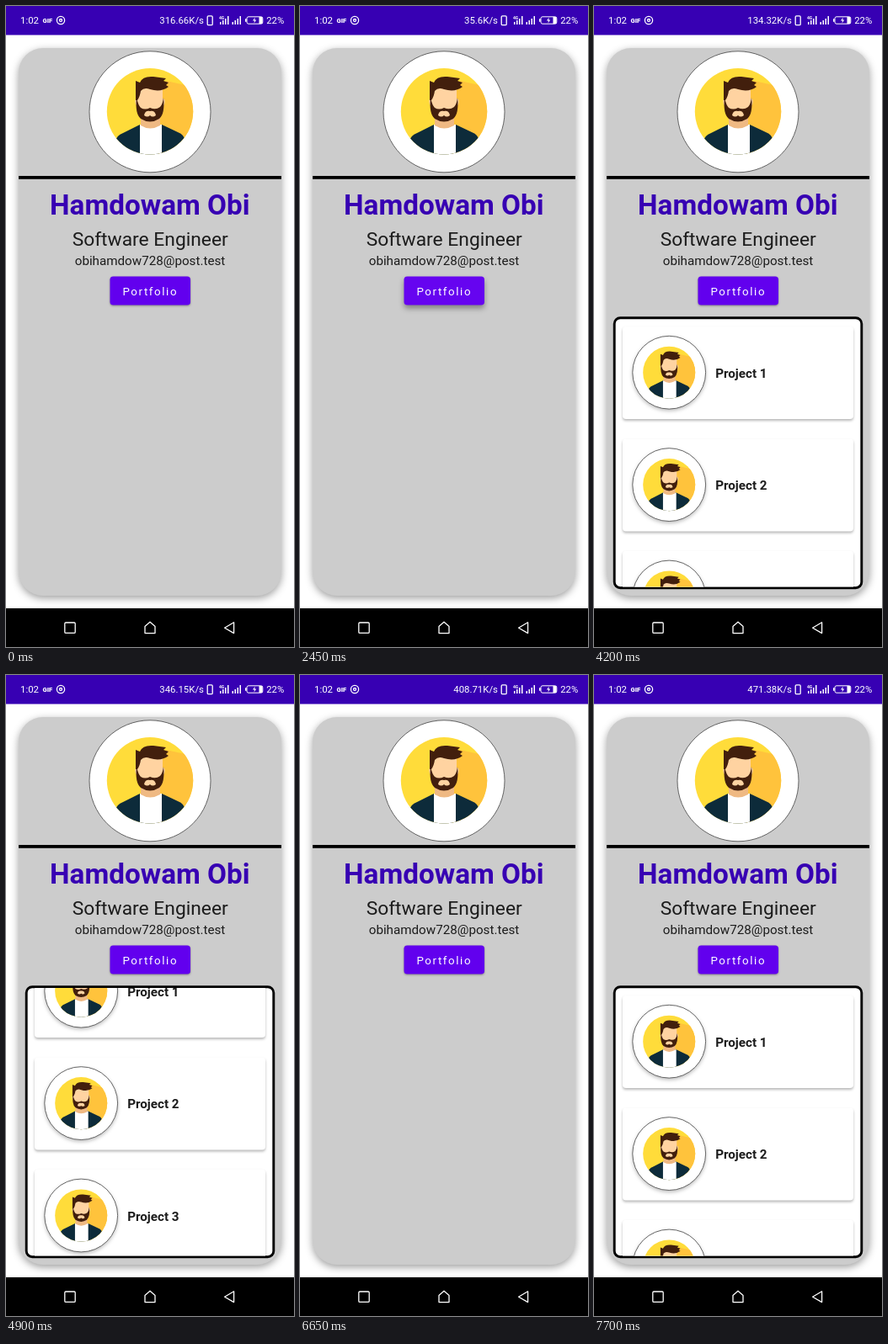
These frames come from a looping animation (342 px wide and 762 px high, 8 s). An HTML page:

```html
<!DOCTYPE html>
<html lang="en">
<head>
<meta charset="utf-8">
<title>Profile card</title>
<style>
  html, body { margin: 0; width: 100%; height: 100%; overflow: hidden; background: #fff; }
  svg { display: block; width: 342px; height: 762px; font-family: Roboto, sans-serif; }
  .mid { text-anchor: middle; }
  .status { font-size: 11.4px; fill: #fff; }
  .project { font-size: 15.2px; font-weight: 700; fill: #1c1c1c; }
  .line { fill: none; stroke: #fff; stroke-width: 1.3; stroke-linejoin: round; }
  #card { filter: drop-shadow(0 3px 5px rgba(0,0,0,.38)); }
  .item { fill: #fff; filter: drop-shadow(0 2px 1.5px rgba(0,0,0,.28)); }
  .lift { filter: drop-shadow(0 2px 2px rgba(0,0,0,.25)); }
  #button { fill: #6200ee; filter: drop-shadow(0 1px 1px rgba(0,0,0,.35)); }
  #button.raised { fill: #6604f0; filter: drop-shadow(0 4px 3px rgba(0,0,0,.36)); }
</style>
</head>
<body>
<svg viewBox="0 0 342 762">
  <defs>
    <clipPath id="disk"><circle cx="171" cy="125.3" r="51.2"/></clipPath>
    <clipPath id="window"><rect x="25.5" y="372" width="291" height="318.5" rx="5"/></clipPath>
    <g id="portrait">
      <g clip-path="url(#disk)">
        <path fill="#ffdc3a" d="M115 70h112v112H115z"/>
        <path fill="#ffc33c" d="M183 100L190 89L213 94L232 112V182H180z"/>
        <path fill="#0d2b3a" d="M130 182V161Q131 154 139 151L159 141H185L204 150Q212 153 213 161V182z"/>
        <path fill="#fff" d="M159 141H185V182H159z"/>
        <path fill="#efb983" d="M160 126H183V142Q171 149 160 142z"/>
        <path fill="#ffd3a1" d="M156 94H186V110Q190 110 188 117L186 120Q184 134 171 135Q158 134 156 120L154 117Q152 110 156 110z"/>
        <path fill="#421f0d" d="M154 112V89L159 91Q162 83 175 84L190 86L187 89L193 91L190 94L193 96Q184 103 171 99Q164 96 160 101Q159 108 156 112z"/>
        <path fill="#421f0d" d="M155 109Q157 118 160 121Q165 124 171 121Q178 124 183 120Q186 117 187 109Q189 128 182 134Q171 141 160 134Q153 128 155 109z"/>
        <path fill="#ffd3a1" d="M164 130Q165 124 171 125Q177 124 178 130Q174 133 171 130Q168 133 164 130z"/>
      </g>
    </g>
    <g id="bars">
      <path fill="#fff" d="M0 8h1.5v3H0zM3 6h1.5v5H3zM6 4h1.5v7H6zM9 1h1.5v10H9z"/>
    </g>
  </defs>

  <rect width="342" height="762" fill="#fff"/>
  <rect id="card" x="15" y="50" width="312" height="651" rx="29" fill="#ccc"/>
  <circle cx="171" cy="125.8" r="72" fill="#fff" stroke="#555" stroke-width=".9"/>
  <use href="#portrait"/>
  <rect x="15" y="202" width="312" height="3.8"/>

  <text class="mid" x="170.8" y="248" font-size="33.25" font-weight="700" fill="#3700b3">Hamdowam Obi</text>
  <text class="mid" x="171.2" y="285" font-size="22.8" fill="#1c1c1c">Software Engineer</text>
  <text class="mid" x="171" y="308" font-size="15.2" fill="#1c1c1c">obihamdow728@post.test</text>

  <rect id="button" x="123.5" y="321.5" width="95.5" height="34" rx="3.8"/>
  <text x="138.4" y="343.7" font-size="13.3" letter-spacing="1.6" fill="#fff">Portfolio</text>

  <g id="list">
    <rect x="24.2" y="370.7" width="293.6" height="321" rx="7" fill="#fff" stroke="#000" stroke-width="2.9"/>
    <g clip-path="url(#window)"><g id="items"></g></g>
  </g>

  <rect width="342" height="34.5" fill="#3700b3"/>
  <g class="status">
    <text x="17" y="21.3">1:02</text>
    <text x="43.5" y="20" font-size="7.6" font-weight="900">GIF</text>
    <circle class="line" cx="65" cy="17" r="4.6"/>
    <circle class="line" cx="65" cy="17" r="1.5"/>
    <text id="speed" x="235" y="21.3" text-anchor="end"></text>
    <rect class="line" x="239.2" y="11.8" width="6" height="10.8" rx="1.2" stroke-width="1"/>
    <text x="253" y="15.5" font-size="5" font-weight="700">4G</text>
    <use href="#bars" x="254" y="11"/>
    <use href="#bars" x="268.5" y="11"/>
    <rect class="line" x="286" y="12.8" width="18.8" height="8.4" rx="2" style="stroke-width:1"/>
    <path d="M284 15.3h1.6v3.4H284zM300.5 13h4v8h-4zM295.7 13.5L293 17.5h2l-.5 3 2.7-4h-2z"/>
    <text x="330.3" y="21.3" text-anchor="end">22%</text>
  </g>

  <rect y="716" width="342" height="46"/>
  <g class="line">
    <rect x="69.8" y="733" width="12.4" height="12.4" rx="1.2"/>
    <path d="M165 737.5L171 732.3L177 737.5V745.6H165z"/>
    <path d="M259.6 739.2L270.6 732.8V745.6z"/>
  </g>
</svg>
<script>
const LOOP = 8000, PITCH = 133.4;
const $ = id => document.getElementById(id);

// start time, network speed, list scroll (null = closed), button raised
const steps = [
  [0, "316.66", null, false],
  [350, "316.66", 0, true],
  [700, "77.14", null, true],
  [1400, "77.14", null, false],
  [2450, "35.6", null, true],
  [2800, "35.6", 0, true],
  [3150, "35.6", 0, false],
  [3500, "134.32", null, false],
  [4200, "134.32", 0, false],
  [4900, "346.15", 60, false],
  [5250, "346.15", 99.7, false],
  [6650, "408.71", null, false],
  [7350, "471.38", 99.7, false],
  [7700, "471.38", 0, false]
];

const item = n => `<g transform="translate(0 ${(n - 1) * PITCH})">
  <rect class="item" x="34" y="381" width="274" height="110" rx="4"/>
  <circle class="lift" cx="89.2" cy="435.7" r="43.4" fill="#fff" stroke="#555" stroke-width=".9"/>
  <use href="#portrait" transform="translate(89.2 435.7) scale(.606) translate(-171 -125.3)"/>
  <text class="project" x="144.2" y="442">Project ${n}</text>
</g>`;
$("items").innerHTML = [1, 2, 3, 4].map(item).join("");

let shown;
function draw() {
  const time = performance.now() % LOOP;
  const step = steps.findLast(([at]) => at <= time);
  if (step !== shown) {
    const [, speed, scroll, raised] = shown = step;
    $("speed").textContent = speed + "K/s";
    $("list").style.display = scroll === null ? "none" : "";
    $("items").setAttribute("transform", `translate(0 ${-(scroll || 0)})`);
    $("button").classList.toggle("raised", raised);
  }
  requestAnimationFrame(draw);
}
draw();
</script>
</body>
</html>
```
